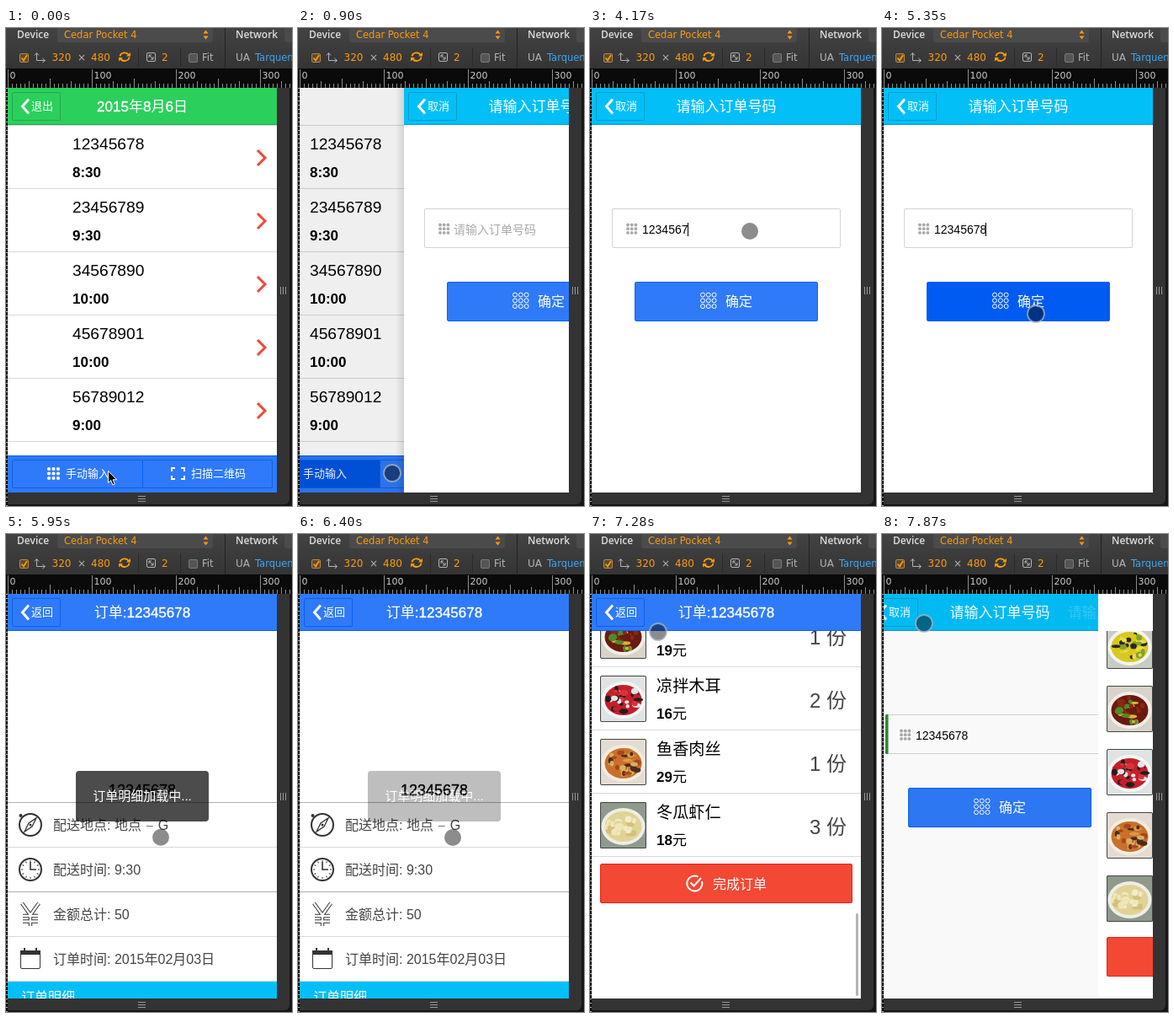
An HTML page for the animation above (8000 ms loop, 340 px wide and 567 px high).

```html
<!DOCTYPE html>
<html lang="zh">
<head>
<meta charset="utf-8">
<title>Order lookup</title>
<style>
html, body { margin: 0; width: 100%; height: 100%; overflow: hidden; background: #333; }
svg { display: block; width: 340px; height: 567px; }
text { font-family: "Liberation Sans", "Noto Sans CJK SC", "Noto Sans CJK", sans-serif; font-weight: 300; white-space: pre; }
.tool { font-family: "DejaVu Sans", sans-serif; font-weight: 400; }
.cap { font-family: "Open Sans", sans-serif; font-weight: 600; }
.mid { text-anchor: middle; }
.end { text-anchor: end; }
.medium { stroke: currentColor; stroke-width: .35px; }
.bold { font-weight: 700; }
.normal { font-weight: 400; }
</style>
</head>
<body>
<svg id="stage" viewBox="0 0 340 567"></svg>
<script>
const GREEN = '#2bd05c', BLUE = '#2f7af8', EDGE = '#0c60ee', CYAN = '#02bff8', RED = '#f24834';
const LOOP = 8000, STEP = 148.6, SLIDE = 500, MAX_SCROLL = 468;

const text = (x, y, size, str, fill = '#000', cls = '') =>
  `<text x="${x}" y="${y}" font-size="${size}" fill="${fill}" color="${fill}" class="${cls}">${str}</text>`;
const rect = (x, y, w, h, fill, more = '') =>
  `<rect x="${x}" y="${y}" width="${w}" height="${h}" fill="${fill}" ${more}/>`;
const box = (x, y, w, h, fill, line, more = '') =>
  rect(x + .5, y + .5, w - 1, h - 1, fill, `stroke="${line}" rx="1.5" ${more}`);
const path = (d, stroke, width = 1, fill = 'none') =>
  `<path d="${d}" stroke="${stroke}" stroke-width="${width}" fill="${fill}"/>`;
const circle = (x, y, r, fill, more = '') => `<circle cx="${x}" cy="${y}" r="${r}" fill="${fill}" ${more}/>`;
const list = (n, fn) => Array.from({ length: n }, (_, i) => fn(i)).join('');
const rule = (y, color = '#d9d9d9') => rect(2, y, 320, 1, color);
const dots = (x, y, gap, r, fill, more) =>
  list(9, i => circle(x + i % 3 * gap, y + Math.floor(i / 3) * gap, r, fill, more));

function header(id, fill, edge, back, title) {
  return `<g id="${id}Head">${rect(2, 71, 320, 44, fill)}${rule(114, edge)}
    ${box(7, 76, 58, 34, 'none', edge)}${path('M27 84.5L19.5 93L27 101.5', '#fff', 3)}
    ${text(30, 97, 13, back, '#fff')}${text(162, 99, 17, title, '#fff', 'mid')}
    ${id === 'form' ? `<g id="ghost">${text(162, 99, 17, title, '#fff', 'mid')}</g>` : ''}</g>`;
}

function page(id, body, head) {
  return `<g id="${id}">${rect(-8, 71, 10, 480, 'url(#shade)', `id="${id}Shade"`)}
    ${rect(2, 71, 320, 480, '#fff')}${body}${head}</g>`;
}

// ---- developer tool frame
function frame() {
  const orange = '#fb9c0a', grey = '#b4b4b4';
  const tick = x => x % 100 === 0 ? 22 : x % 50 === 0 ? 11 : x % 25 === 0 ? 8 : 5;
  return rect(0, 0, 340, 567, '#161616') + rect(-8, 30, 345, 535, '#333', 'rx="6"') + rect(0, 0, 340, 48, 'url(#bar)') +
    text(13, 12, 12, 'Device', '#ddd', 'cap') + rect(61, -4, 185, 21, '#4b4b4b', 'rx="3"') +
    text(69, 12, 11.5, 'Cedar Pocket 4', orange, 'tool') +
    path('M234.5 6.5L237.5 2.5L240.5 6.5ZM234.5 9.5L237.5 13.5L240.5 9.5Z', 'none', 0, orange) +
    rect(260, 0, 1, 48, '#222') + text(273, 12, 12, 'Network', '#ddd', 'cap') +
    rect(331, -4, 20, 21, '#4b4b4b', 'rx="3"') +
    box(16, 30, 11, 11, '#5a4a32', '#b98a45') + path('M18.5 35.5L21 38.5L25 32', orange, 1.8) +
    path('M36.5 30V38.5H46M34 32.5L36.5 29.5L39 32.5M43.5 36L46.5 38.5L43.5 41', grey) +
    text(54.5, 39, 12, '320', orange, 'tool') + text(85, 39, 12, '×', grey, 'tool') +
    text(101, 39, 12, '480', orange, 'tool') +
    path('M135.5 33.5A5.5 5 0 0 1 146 32.5M146.5 34.5A5.5 5 0 0 1 136 36', orange, 1.8) +
    path('M143 33.5H148V29ZM134 39.5V35H139Z', 'none', 0, orange) +
    rect(157, 23, 1, 23, '#2a2a2a') +
    box(167, 29, 11, 11, 'none', grey) + path('M170 35V32H173M170 32L175 37M175 34V37H172', grey) +
    text(185, 39, 12, '2', orange, 'tool') + rect(207, 23, 1, 23, '#2a2a2a') +
    box(217, 30, 11, 11, '#555', '#7a7a7a') + text(233, 39, 11.5, 'Fit', grey, 'tool') +
    text(273, 39, 12, 'UA', grey, 'tool') + text(296, 39, 11.5, 'Tarquen,', '#3ea6f5', 'tool') +
    rect(0, 48, 340, 23, '#0a0a0a') +
    list(68, i => rect(2 + i * 5, 71 - tick(i * 5), 1, tick(i * 5), '#8c8c8c')) +
    list(4, i => text(4.5 + i * 100, 60, 11, i * 100, '#ccc', 'tool')) +
    rect(0, 71, 2, 496, '#0a0a0a') + list(100, i => rect(0, 71 + i * 5, 2, 1, '#aaa')) +
    list(3, i => rect(326 + i * 3, 307, 1, 9, '#999') + rect(157, 555 + i * 3, 9, 1, '#999'));
}

// ---- screens
function listPage() {
  const times = ['8:30', '9:30', '10:00', '10:00', '9:00'];
  const rows = list(5, i => {
    const y = 115 + i * 75;
    const code = list(8, k => (i + k + 1) % 10);
    return text(79, y + 29, 19.2, code) + text(79, y + 62, 17, times[i], '#000', 'bold') +
      path(`M299 ${y + 30}L308 ${y + 39}L299 ${y + 48}`, '#f0483a', 3) + rule(y + 75);
  });
  const foot = rect(2, 507, 320, 44, BLUE) + rule(507, EDGE) +
    box(7, 512, 156, 34, BLUE, EDGE, 'id="manual"') + box(162, 512, 155, 34, 'none', EDGE) +
    dots(51, 523, 5.5, 2.1, '#fff') + text(71, 533, 13, '手动输入', '#fff') +
    path('M197 526V522H201M208 522H212V526M212 531V535H208M201 535H197V531', '#fff', 2) +
    text(220, 533, 13, '扫描二维码', '#fff');
  return page('list', rule(115) + rows + foot,
    header('list', GREEN, '#28a54c', '退出', '<tspan class="medium">2015</tspan>年<tspan class="medium">8</tspan>月<tspan class="medium">6</tspan>日'));
}

function formPage() {
  const body = box(26, 214, 272, 47, '#fff', '#d4d4d4') + rect(26, 214, 3.5, 47, '#2f8a38', 'id="valid" rx="1"') +
    dots(45, 233.5, 4.7, 1.9, '#aaa') +
    `<g id="hint">${text(61, 244, 14, '请输入订单号码', '#aaa')}</g>` +
    '<text id="code" x="62" y="244" font-size="14"></text>' + rect(61, 231, 1, 16, '#000', 'id="caret"') +
    box(53, 301, 218, 47, BLUE, EDGE, 'id="ok"') +
    dots(134, 316.5, 6.8, 2.5, 'none', 'stroke="#fff"') + text(161, 330, 16, '确定', '#fff');
  return page('form', body, header('form', CYAN, '#0a9dc7', '取消', '请输入订单号码'));
}

function random(seed) {
  return () => (seed = seed * 16807 % 2147483647) / 2147483647;
}

// A dish photo reduced to a plate and a few flat blobs
function dish(y, back, plate, colors, seed) {
  const rnd = random(seed * 7919);
  const blobs = list(34, i => {
    const a = rnd() * 6.28, d = Math.sqrt(rnd()) * 19;
    return `<ellipse cx="${39.5 + Math.cos(a) * d}" cy="${y + 29 + Math.sin(a) * d * .8}" rx="${2 + rnd() * 4}" ry="${1.5 + rnd() * 2.5}" fill="${colors[i % colors.length]}"/>`;
  });
  return rect(12, y, 55, 55, back) +
    `<ellipse cx="39.5" cy="${y + 29}" rx="26" ry="22" fill="${plate}"/>` +
    `<ellipse cx="39.5" cy="${y + 29}" rx="22" ry="18" fill="${colors[0]}"/>` + blobs +
    box(12, y, 55, 55, 'none', '#444');
}

function detailPage() {
  const meals = [
    ['木耳炒蛋', 22, 2, '#c9ccc4', '#f4f4ee', ['#d8c91f', '#2a2a22', '#e7dc4a', '#7fa32c']],
    ['香辣豆丁', 19, 1, '#d8d2c8', '#f1eee8', ['#6a1a10', '#8d2616', '#d9b43c', '#4f8a2a']],
    ['凉拌木耳', 16, 2, '#dfe3e2', '#f7f7f7', ['#c3202a', '#231c20', '#d7343a', '#e4e4e6']],
    ['鱼香肉丝', 29, 1, '#e4dcd0', '#f3ece0', ['#c9702a', '#e09a46', '#4a2c1c', '#d8b060', '#a8461e']],
    ['冬瓜虾仁', 18, 3, '#8f9a8c', '#eeeee6', ['#e0d396', '#efe6b8', '#d3c07a', '#f2ecca']]
  ];
  const rows = ['配送地点: 地点 <tspan font-size="11">－</tspan> G', '配送时间: 9:30', '金额总计: 50', '订单时间: 2015年02月03日'];
  const ink = '#333', yen = 'M19 438L29 452L39 438M29 452V465M20 453H38M20 459.5H38';
  const icons = circle(29, 345, 13, 'none', `stroke="${ink}" stroke-width="2"`) +
    path('M36 337L31 347L22 353L27 343Z', ink, 1.3) + circle(29, 345, 1.5, ink) + circle(17.5, 334, 2, ink) +
    circle(29, 398, 13, 'none', `stroke="${ink}" stroke-width="2"`) + path('M29 389V398H36', ink, 1.6) +
    list(12, i => `<g transform="rotate(${i * 30} 29 398)">${rect(28.5, 387, 1, 2, ink)}</g>`) +
    path(yen, ink, 4.4) + path(yen, '#fff', 2.4) +
    box(17, 494, 24, 22, 'none', ink) + rect(17, 494, 24, 5, ink) + rect(21, 491, 2, 5, ink) + rect(35, 491, 2, 5, ink);
  const food = meals.map(([name, price, count, back, plate, colors], i) => {
    const y = 562 + i * 75;
    return dish(y + 11, back, plate, colors, i + 3) + text(79, y + 30, 19.2, name) +
      text(79, y + 62, 17, `<tspan class="bold">${price}</tspan><tspan class="normal">元</tspan>`) +
      text(305, y + 49, 24, count + ' 份', '#444', 'end');
  }).join('');
  const content = text(162, 310, 18, '12345678', '#000', 'mid medium') +
    rows.map((row, i) => rule(318 + i * 53, i % 2 ? '#d9d9d9' : '#b0b0b0') + text(56, 351 + i * 53, 16, row, '#444')).join('') +
    icons + rule(530) + rect(2, 531, 320, 31, CYAN) + text(18, 555, 16, '订单明细', '#fff') +
    `<g id="lines">${list(5, i => rule(637 + i * 75))}</g>` + food +
    box(12, 946, 300, 47, RED, '#e42112') +
    path('M133 967A9 9 0 1 1 128.5 961.5M119.5 968.5L123.5 972.5L132 963', '#fff', 2) +
    text(146, 976, 16, '完成订单', '#fff');
  const toast = `<g id="toast">${rect(83, 281, 158, 60, '#000', 'fill-opacity=".7" rx="4"')}
    ${text(162, 316, 15, '订单明细加载中...', '#fff', 'mid')}</g>`;
  return page('detail', `<g clip-path="url(#below)"><g id="content">${content}</g></g>` +
    rect(316, 0, 3, 98, '#b5b5b5', 'id="thumb" rx="1.5"') + toast,
    header('detail', BLUE, EDGE, '返回', '订单<tspan class="medium">:12345678</tspan>'));
}

document.getElementById('stage').innerHTML = `<defs>
  <linearGradient id="bar" x2="0" y2="1"><stop stop-color="#434343"/><stop offset="1" stop-color="#343434"/></linearGradient>
  <linearGradient id="shade"><stop stop-color="#000" stop-opacity="0"/><stop offset="1" stop-color="#000" stop-opacity=".3"/></linearGradient>
  <clipPath id="view">${rect(2, 71, 320, 480, '#000')}</clipPath>
  <clipPath id="below">${rect(2, 115, 320, 436, '#000')}</clipPath></defs>
  ${frame()}
  <g clip-path="url(#view)">${rect(2, 71, 320, 480, '#000')}${listPage()}${formPage()}${detailPage()}</g>
  <g id="touch">${circle(0, 0, 10, '#000', 'fill-opacity=".45"')}${circle(0, 0, 10, 'none', 'id="ring" stroke="#a4b0c4" stroke-opacity=".8" stroke-width="1.8"')}</g>
  <path id="arrow" d="M121.5 525.5V539.5L124.7 536.5L127 542L129.3 541L127 535.8H131.5Z" fill="#000" stroke="#fff"/>`;

const el = {};
document.querySelectorAll('#stage [id]').forEach(node => el[node.id] = node);

// ---- motion
function ease(x) {
  if (x <= 0) return 0;
  if (x >= 1) return 1;
  const bez = (s, a, b) => 3 * (1 - s) ** 2 * s * a + 3 * (1 - s) * s * s * b + s ** 3;
  let lo = 0, hi = 1;
  for (let i = 0; i < 24; i++) {
    const s = (lo + hi) / 2;
    if (bez(s, .36, .04) < x) lo = s; else hi = s;
  }
  return bez(lo, .66, 1);
}

// Piecewise linear track of [time, ...values]
function track(points, t) {
  let i = 0;
  while (i < points.length - 2 && points[i + 1][0] <= t) i++;
  const [t0, ...a] = points[i], [t1, ...b] = points[i + 1];
  const k = Math.min(1, Math.max(0, (t - t0) / (t1 - t0)));
  return a.map((v, n) => v + (b[n] - v) * k);
}

const POINTER = [[150, 122, 535], [500, 122, 535], [590, 112, 528], [900, 112, 528], [1480, 190, 241],
  [4770, 190, 241], [5200, 183, 339], [5500, 183, 339], [5950, 184, 360], [6400, 184, 360], [6550, 184, 400],
  [6840, 150, 200], [6990, 150, 340], [7281, 81, 116], [7580, 50, 106], [8000, 50, 106]];
const SCROLL = [[6540, 0], [6690, 70], [6840, 230], [6990, 390], [7130, 500], [7281, 555], [7430, 495], [7580, MAX_SCROLL]];
const TOAST = [[5480, 0], [5600, 1], [6250, 1], [6470, 0]];
const KEYS = [2680, 2980, 3280, 3580, 3720, 4020, 4170, 4460];
const PRESSES = [[590, 960], [5200, 5480], [6540, 6850], [6985, 7290], [7570, 8100]];
const BACK = 7724;

const within = (t, a, b) => t >= a && t < b;
const show = (node, on) => node.style.display = on ? '' : 'none';

function place(id, x, opacity, visible, head, shade = 0) {
  show(el[id], visible);
  show(el[id + 'Head'], head);
  el[id].setAttribute('transform', `translate(${Math.round(x)} 0)`);
  el[id].setAttribute('opacity', opacity);
  el[id + 'Shade'].setAttribute('opacity', shade);
}

function render(t) {
  const back = t > BACK;
  const a = ease((t - 780) / SLIDE);
  const b = back ? 1 - ease((t - BACK) / SLIDE) : ease((t - 5480) / SLIDE);
  place('list', -105.6 * a, 1 - .1 * a, a < 1, a === 0);
  place('form', 320 * (1 - a) - 105.6 * b, 1 - .1 * b, a > 0 && b < 1, b === 0 || back, 1 - a);
  place('detail', 320 * (1 - b), 1, b > 0, !back, back ? 0 : 1 - b);
  show(el.lines, !back);

  show(el.ghost, back);
  el.ghost.setAttribute('transform', `translate(${149 * (1 - b) + 105.6 * b} 0)`);
  el.ghost.setAttribute('opacity', b);

  el.manual.setAttribute('fill', t >= 590 ? '#0056e4' : BLUE);
  el.ok.setAttribute('fill', within(t, 5190, 5600) ? '#005bf2' : BLUE);

  const typed = KEYS.filter(k => k <= t + 25).length;
  el.code.textContent = '12345678'.slice(0, typed);
  show(el.hint, typed === 0);
  el.caret.setAttribute('x', 61 + Math.round(typed * 7.786));
  show(el.caret, within(t, 1480, 1770) || within(t, 2215, 5450));
  show(el.valid, t > 5450);

  const [scroll] = track(SCROLL, t), over = Math.max(0, scroll - MAX_SCROLL);
  el.content.setAttribute('transform', `translate(0 ${-Math.round(scroll)})`);
  const size = 185 - over;
  el.thumb.setAttribute('height', size);
  el.thumb.setAttribute('y', over ? 548 - size : 118 + scroll / MAX_SCROLL * 245);
  show(el.thumb, within(t, 6600, 7700));
  el.toast.setAttribute('opacity', track(TOAST, t)[0]);

  const [x, y] = track(POINTER, t);
  show(el.arrow, t < 140);
  show(el.touch, t >= 140);
  el.touch.setAttribute('transform', `translate(${x} ${y})`);
  show(el.ring, PRESSES.some(p => within(t, ...p)));
}

const start = performance.now();
function tick() {
  const t = (performance.now() - start) % LOOP;
  render(Math.floor((t + 9) / STEP) * STEP);
  requestAnimationFrame(tick);
}
tick();
</script>
</body>
</html>
```
